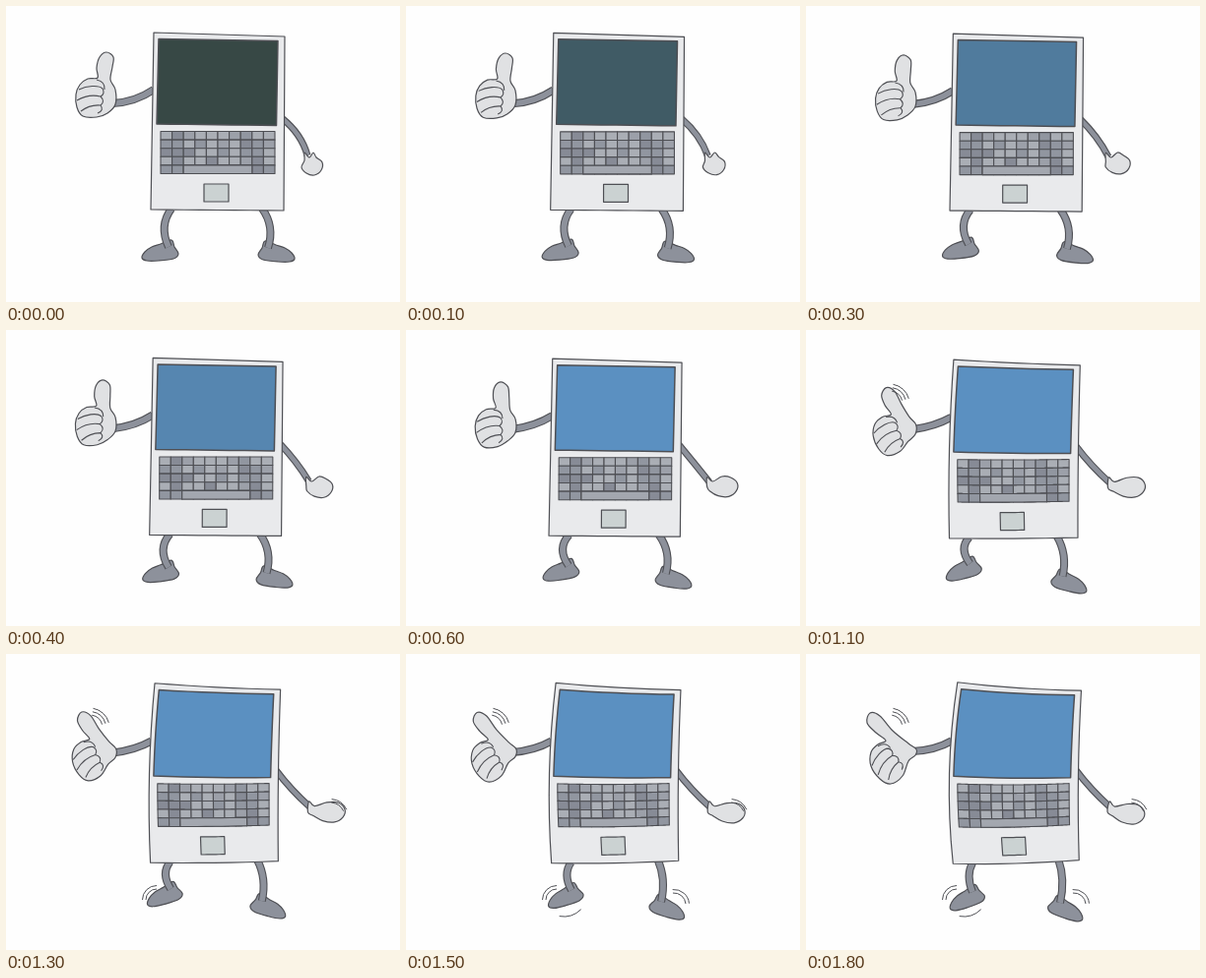
An HTML page with a canvas that plays this animation: 400 by 301 pixels, repeating every 1900 ms.

```html
<!DOCTYPE html>
<html>
<head>
<meta charset="utf-8">
<style>
html, body { margin: 0; width: 100%; height: 100%; overflow: hidden; background: #fefefe; }
canvas { display: block; width: 400px; height: 301px; }
</style>
</head>
<body>
<canvas id="stage" width="400" height="301"></canvas>
<script>
const ctx = document.getElementById('stage').getContext('2d');
const STEP = 100, STEPS = 19;
const INK = '#4e4f54', LIMB = '#8d919b', GLOVE = '#e0e1e3';
const KEYS = ['#9ca0a9', '#aaaeb5', '#9196a0', '#878b96'];

const clamp = v => Math.min(1, Math.max(0, v));
const mix = (a, b, u) => a.map((v, i) => v + (b[i] - v) * u);
const rad = deg => deg * Math.PI / 180;

// Outlines as x, y pairs: first and last pose
const thumbUp = [93,73, 92,63, 95,52, 102,47, 109,52, 108,62, 106,75, 111,85,
  111,100, 103,109, 92,113, 78,112, 72,103, 71,90, 75,80, 83,74];
const thumbOut = [81,88, 71,80, 62,70, 65,60, 75,63, 88,78, 104,91, 112,97,
  111,103, 104,109, 98,124, 86,132, 75,127, 66,114, 66,100, 73,92];
const palmShut = [303,149, 308,154, 312,149, 315,154, 321,159, 320,167, 313,172, 305,170, 300,164, 303,157];
const palmOpen = [307,150, 313,154, 325,149, 337,148, 344,154, 343,162, 335,168, 323,168, 313,164, 307,161];
const shoe = [-27,15, -24,9, -17,4, -8,1, 3,-3, 6,4, 10,11, 5,16, -10,18, -22,18];
const fingers = new Path2D(
  'M-14-10C-6-14 6-15 10-11Q13-6 8-3M-16 1Q-4-6 8-3Q13 2 8 6M-12 12Q-3 5 8 6Q12 11 5 14M4-20Q13-18 12-10');

let sink, bend; // the two movements: settling down, then bending over

// Moves a point of the upright body into the current pose
function warp(x, y) {
  const u = (x - 215) / 66, v = (y - 118) / 90;
  return [
    x - sink * (4.5 + 1.5 * u + 0.7 * v) + bend * (4 - 2 * u) * v * v,
    y + sink * 4 + bend * (1.5 * (1 - u * u) - 2.3 * u * v)
  ];
}

function paint(path, fill, width = 1.2) {
  if (fill) { ctx.fillStyle = fill; ctx.fill(path); }
  ctx.lineWidth = width;
  ctx.strokeStyle = INK;
  ctx.stroke(path);
}

function place(x, y, angle, draw) {
  ctx.save();
  ctx.translate(x, y);
  ctx.rotate(angle);
  draw();
  ctx.restore();
}

// Closed smooth curve through the points
function blob(p) {
  const n = p.length / 2, path = new Path2D();
  const q = (i, k) => p[((i + n) % n) * 2 + k];
  path.moveTo(p[0], p[1]);
  for (let i = 0; i < n; i++) {
    const c = [];
    for (const k of [0, 1]) c.push(q(i, k) + (q(i + 1, k) - q(i - 1, k)) / 6);
    for (const k of [0, 1]) c.push(q(i + 1, k) - (q(i + 2, k) - q(i, k)) / 6);
    path.bezierCurveTo(...c, q(i + 1, 0), q(i + 1, 1));
  }
  path.closePath();
  return path;
}

// Warped four-sided panel, each edge cut into short pieces
function panel(corners, fill, width) {
  const path = new Path2D();
  corners.forEach((a, i) => {
    const b = corners[(i + 1) % 4];
    for (let j = 0; j < 8; j++) path.lineTo(...warp(...mix(a, b, j / 8)));
  });
  path.closePath();
  paint(path, fill, width);
}

const box = (x, y, w, h, fill, width = 1.1) =>
  panel([[x, y], [x + w, y], [x + w, y + h], [x, y + h]], fill, width);

function limb(from, ctrl, to, width = 8) {
  const path = new Path2D();
  path.moveTo(...from);
  path.quadraticCurveTo(...ctrl, ...to);
  paint(path, null, width);
  ctx.lineWidth = width - 2.2;
  ctx.strokeStyle = LIMB;
  ctx.stroke(path);
}

function leg(side, hipX, x, y, turn) {
  place(x, y, rad(side * turn), () => {
    ctx.scale(-side, 1);
    paint(blob(shoe), LIMB);
  });
  const hip = warp(hipX, 206);
  limb(hip, [hip[0] + side * (13 - 6 * bend), (hip[1] + y) / 2], [x, y + 4]);
}

function keyboard() {
  let seed = 7;
  const tone = () => KEYS[(seed = seed * 16807 % 2147483647) % KEYS.length];
  const x = 157, y = 127.5, w = 11.6, h = 8.6;
  for (let r = 0; r < 5; r++)
    for (let c = 0; c < 10; c++) box(x + c * w, y + r * h, w, h, tone());
  box(x + 2 * w, y + 4 * h, 6 * w, h, '#a3a7af');
}

function thumbHand() {
  const turn = 0.3 * sink + 0.7 * bend, dip = 7 * (sink - bend);
  limb(warp(150, 85), [131, 98], [108, 99 + dip / 2]);
  place(0, dip, 0, () => paint(blob(mix(thumbUp, thumbOut, turn)), GLOVE));
  place(88 - 4 * turn, 95 + 16 * turn + dip, rad(-44 * turn), () => paint(fingers, null, 1.1));
}

function openHand(s) {
  const open = clamp(s / 9);
  limb(warp(280, 114), mix([300, 130], [289, 138], open), mix([306, 152], [309, 156], open), 7);
  place(308, 156, 0.2 * bend, () => {
    ctx.translate(-308, -156);
    paint(blob(mix(palmShut, palmOpen, open)), GLOVE);
  });
}

// Nested arcs beside a moving part
function swish(x, y, r, from, to, count) {
  for (let i = 0; i < count; i++) {
    const path = new Path2D();
    path.arc(x, y, r + i * 3.5, rad(from), rad(to));
    paint(path, null, 1);
  }
}

function draw(s) {
  sink = clamp(s / 11);
  bend = clamp((s - 7) / 11);
  ctx.fillStyle = '#fefefe';
  ctx.fillRect(0, 0, 400, 301);
  ctx.lineJoin = 'round';

  leg(-1, 168, 165 + 4 * bend, 241 - 10 * sink + 7 * bend, 8 * sink + 6 * bend);
  leg(1, 260, 266 - 4 * sink - 4 * bend, 242 + 3 * sink + 4 * bend, 7 * sink + 7 * bend);
  thumbHand();
  openHand(s);

  panel([[150, 27], [283, 31], [282, 208], [147, 207]], '#e9eaec');
  const glow = Math.sin(clamp(s / 6) * Math.PI / 2);
  const blue = mix([55, 72, 69], [91, 144, 193], glow).map(Math.round);
  panel([[155, 33.5], [276, 35.5], [274.5, 121.5], [153, 120]], `rgb(${blue})`, 1.5);
  keyboard();
  box(201, 181, 25, 18, '#cbd2d2', 1.2);

  if (s >= 10) swish(85, 75, 13, -80, -15, 3);
  if (s >= 12) {
    swish(329, 166, 15, -85, -25, 2);
    swish(153, 250, 11, 180, 270, 2);
  }
  if (s >= 14) {
    swish(160, 242, 25, 45, 100, 1);
    swish(272, 255, 12, -95, -5, 2);
  }
}

let shown = -1;
function tick() {
  const s = Math.floor(performance.now() / STEP) % STEPS;
  if (s !== shown) draw(shown = s);
  requestAnimationFrame(tick);
}
tick();
</script>
</body>
</html>
```
